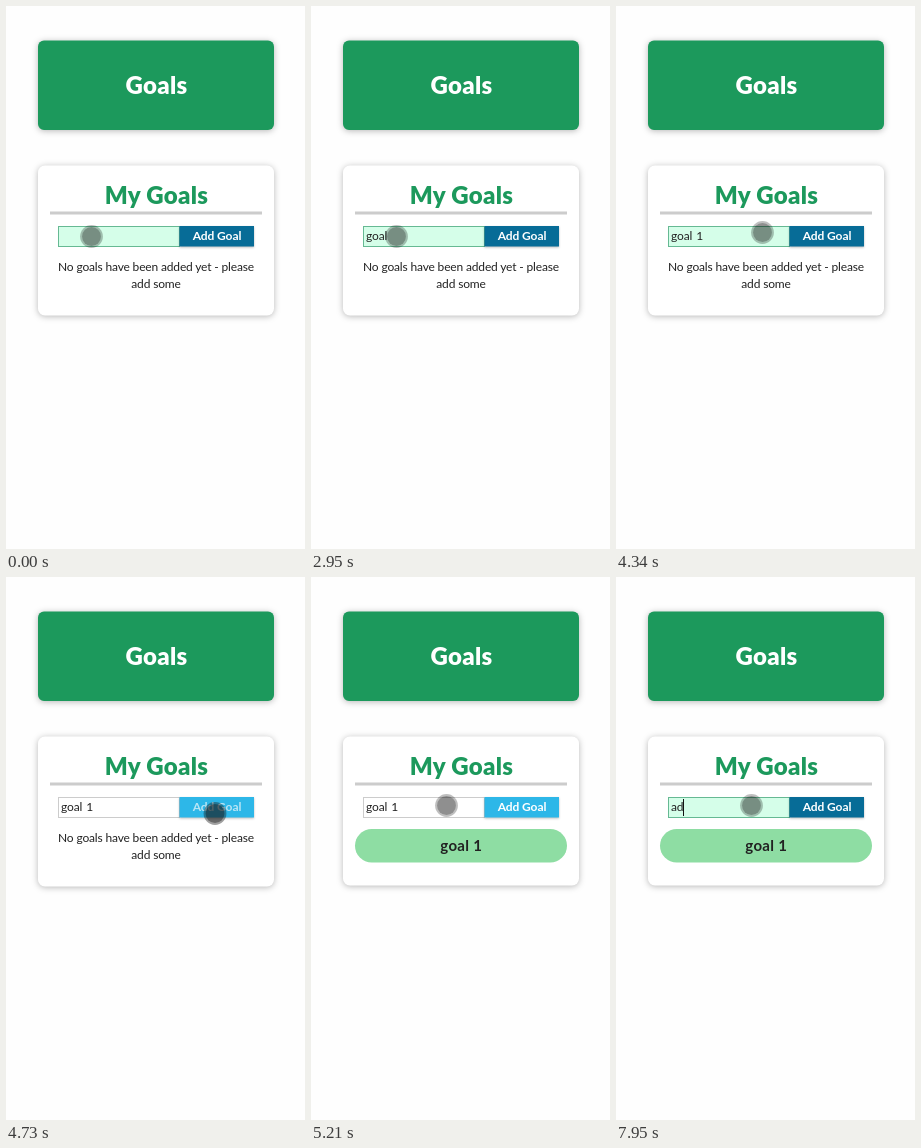
An HTML page that plays this animation: 299 px wide and 543 px high, repeating every 8000 ms.

```html
<!DOCTYPE html>
<html lang="en">
<head>
<meta charset="utf-8">
<title>Goals</title>
<style>
  html, body { margin: 0; width: 100%; height: 100%; overflow: hidden; background: #fefefe; }
  svg { display: block; width: 299px; height: 543px; font: 12px Lato, "Open Sans", sans-serif; letter-spacing: -.16px; fill: #222; }
  .panel { filter: drop-shadow(0 1px 3px rgba(0, 0, 0, .28)); }
  .title { font-size: 24px; font-weight: 900; letter-spacing: .3px; text-anchor: middle; }
  .mid { text-anchor: middle; }
  #field { fill: #fff; stroke: #ccc; }
  #button { fill: #2db7e8; filter: drop-shadow(0 1px 1px rgba(0, 0, 0, .26)); }
  .focus #field { fill: #d5fee9; stroke: #66b993; }
  .focus #button { fill: #076c97; }
  #label { fill: #fff; font-weight: 700; letter-spacing: -.1px; }
  .press #label { fill: #b9e5f5; }
  #typed { white-space: pre; word-spacing: 1.2px; }
  #item { font-size: 15px; font-weight: 700; letter-spacing: .3px; }
  #list, .added #empty { visibility: hidden; }
  .added #list { visibility: visible; }
  #cursor { fill: rgba(0, 0, 0, .25); }
  .press #cursor { fill: rgba(20, 20, 20, .4); }
</style>
</head>
<body>
<svg id="stage" viewBox="0 0 299 543" class="focus">
  <rect class="panel" x="32" y="34.5" width="236" height="89.5" rx="6" fill="#1c995c"/>
  <text class="title" x="150.5" y="88" fill="#fff">Goals</text>

  <rect id="card" class="panel" x="32" y="159.5" width="236" height="150" rx="7" fill="#fff"/>
  <text class="title" x="150.5" y="197.6" fill="#1c995c">My Goals</text>
  <rect x="44" y="205.5" width="212" height="3" fill="#ccc"/>

  <rect id="field" x="52.5" y="220.5" width="121" height="20"/>
  <text id="typed" x="55" y="234"></text>
  <rect id="caret" y="222" width="1" height="17" fill="#111"/>
  <rect id="button" x="173.5" y="220" width="74.5" height="20.5"/>
  <text id="label" class="mid" x="211" y="234">Add Goal</text>

  <g id="empty" class="mid">
    <text x="150" y="265">No goals have been added yet - please</text>
    <text x="150" y="282">add some</text>
  </g>
  <g id="list">
    <rect x="44" y="252" width="212" height="33.5" rx="16.75" fill="#8edda3"/>
    <text id="item" class="mid" x="150.3" y="274">goal 1</text>
  </g>
  <g id="cursor"><circle r="11.4"/><circle r="9.4"/></g>
</svg>
<script>
  const LOOP = 8000;
  const $ = id => document.getElementById(id);
  const stage = $('stage'), typed = $('typed'), caret = $('caret');

  // [start, text, caret shown]
  const typing = [
    [0, '', 0], [190, 'g', 1], [290, 'go', 1], [380, 'goa', 1], [480, 'goal', 1],
    [1080, 'goal', 0], [1480, 'goal', 1], [1970, 'goal', 0], [2460, 'goal', 1], [2950, 'goal', 0],
    [3460, 'goal ', 1], [3760, 'goal 1', 1], [4240, 'goal 1', 0],
    [5500, 'goal 1', 1], [5990, 'goal 1', 0],
    [6390, 'goal ', 1], [6470, 'goal', 1], [6680, 'goa', 1], [6780, 'go', 1],
    [6870, 'g', 1], [6970, '', 1], [7360, '', 0], [7840, 'a', 1], [7950, 'ad', 1]
  ];
  // [start, x, y]
  const moves = [
    [0, 85.5, 230.5], [4140, 91, 230], [4240, 117, 228], [4340, 146.5, 226.5],
    [4430, 176, 229], [4530, 198, 233], [4630, 207, 236], [4720, 209, 236.5],
    [4920, 209, 240], [5010, 186, 237], [5110, 149, 230], [5210, 135.5, 228.5]
  ];

  const at = (steps, t) => steps.findLast(s => s[0] <= t);
  const between = (t, a, b) => t >= a && t < b;

  function draw(t) {
    const [, text, on] = at(typing, t);
    const [, x, y] = at(moves, t);
    const added = t >= 4820;
    stage.classList.toggle('focus', !between(t, 4720, 5500));
    stage.classList.toggle('press', between(t, 4720, 4920));
    stage.classList.toggle('added', added);
    $('card').setAttribute('height', added ? 149 : 150);
    if (typed.textContent !== text) typed.textContent = text;
    const width = text ? typed.getComputedTextLength() : 0;
    caret.setAttribute('x', Math.round(54.5 + width));
    caret.setAttribute('visibility', on ? 'visible' : 'hidden');
    $('cursor').setAttribute('transform', `translate(${x} ${y})`);
  }

  const start = performance.now();
  function tick() {
    draw((performance.now() - start) % LOOP);
    requestAnimationFrame(tick);
  }
  tick();
</script>
</body>
</html>
```
